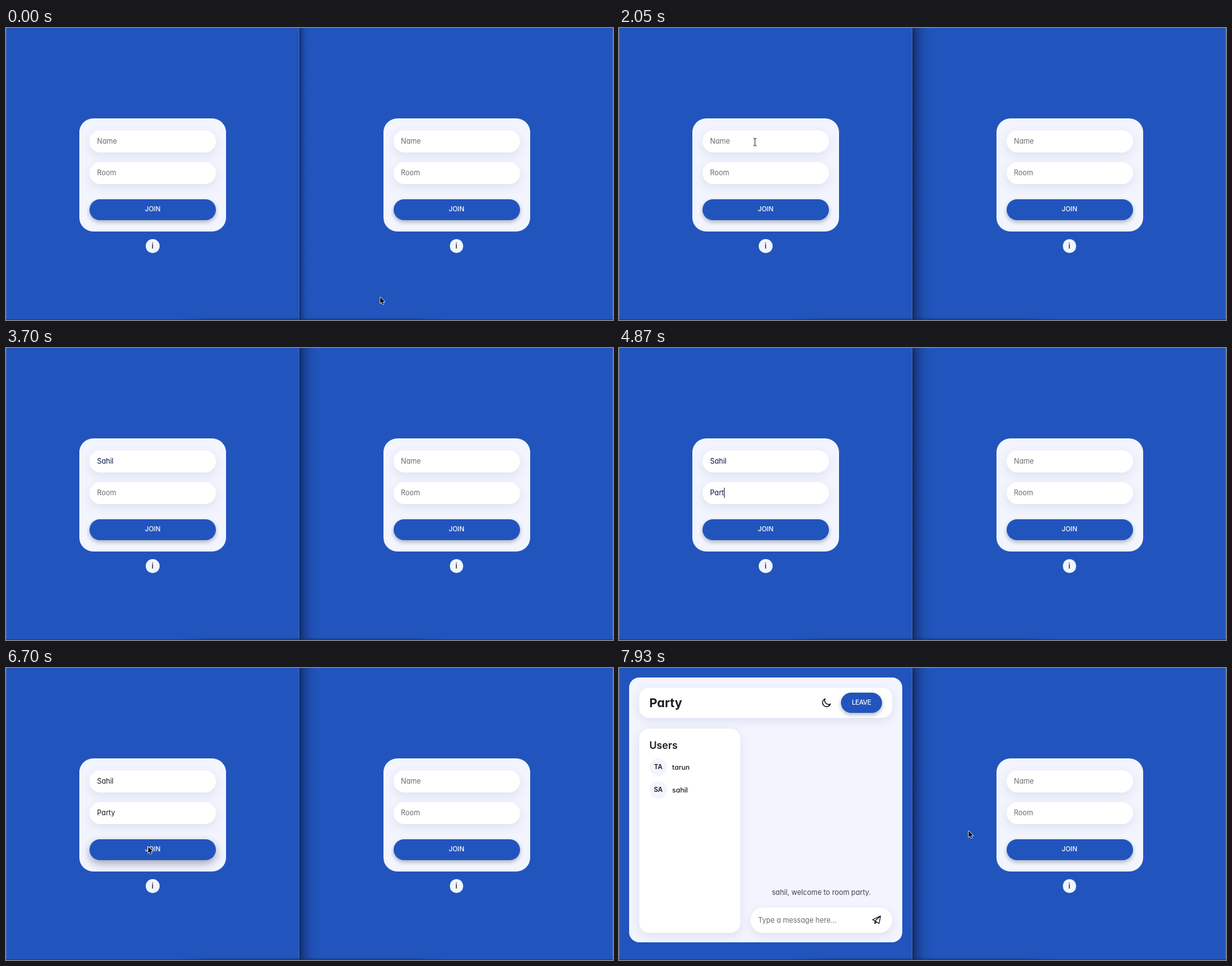
Write an HTML page that moves like this. It is 960 px wide and 462 px high and loops after 8000 ms.

```html
<!DOCTYPE html>
<html lang="en">
<head>
<meta charset="utf-8">
<title>Chat room sign-in</title>
<style>
  html, body { margin: 0; width: 100%; height: 100%; overflow: hidden; background: #2155bd; }
  #stage {
    position: relative; width: 960px; height: 462px; overflow: hidden; background: #2155bd;
    font: 400 11.2px/20px Inter, "Open Sans", sans-serif;
    font-feature-settings: "cv11"; color: #1c1c20;
  }
  #stage div, #stage svg { position: absolute; box-sizing: border-box; }
  .t { height: 20px; margin-top: -10px; white-space: pre; }
  .card { background: #f2f5fe; border-radius: 22px; overflow: hidden; }
  .white { background: #fff; box-shadow: 0 5px 15px rgba(70, 70, 120, .11); }
  .field { left: 16px; width: 200px; height: 34.5px; border-radius: 17.5px; }
  .field .t { left: 12px; top: 17px; }
  .hint { color: #6c6c70; }
  .btn {
    background: #2155bd; color: #fff; border-radius: 17px; text-align: center;
    font-weight: 500; font-size: 10.4px; box-shadow: 0 3px 6px rgba(20, 25, 60, .32);
  }
  .btn.hover { box-shadow: 0 5px 13px rgba(20, 25, 60, .38); }
  .info {
    left: 221px; top: 334px; width: 21.5px; height: 21.5px; border-radius: 50%;
    background: #f2f5fe; text-align: center; font-weight: 500; font-size: 12px; line-height: 21.5px;
  }
  .caret { display: inline-block; width: 1px; height: 16px; margin-right: -1px; vertical-align: -4px; background: #20243c; }
  .avatar {
    left: 16px; width: 28px; height: 28px; border-radius: 50%; background: #f2f5fe;
    text-align: center; font-weight: 600; font-size: 10.4px; line-height: 28px;
  }
  .user { left: 52px; font-weight: 500; font-size: 11px; }
</style>
</head>
<body>
<div id="stage">
  <div id="edge" style="left:465px;top:0;width:40px;height:462px"></div>
  <div style="left:0;top:0;width:1px;height:462px;background:#4a74c9"></div>
  <div style="left:959px;top:0;width:1px;height:462px;background:#4a74c9"></div>
  <div style="left:463px;top:0;width:1px;height:462px;background:#4269b5"></div>
  <div style="left:464px;top:0;width:1px;height:462px;background:#122a60"></div>
  <div style="left:275px;top:457px;width:415px;height:5px;background:linear-gradient(90deg,transparent,rgba(8,22,60,.3) 12%,rgba(8,22,60,.3) 88%,transparent);-webkit-mask-image:linear-gradient(transparent,#000)"></div>
  <div style="left:0;top:461px;width:960px;height:1px;background:#173a80"></div>

  <div id="left" style="left:0;top:0"></div>
  <div id="right" style="left:480.5px;top:0"></div>

  <div id="chat" class="card" style="left:16px;top:14.5px;width:432px;height:419.5px;border-radius:16px">
    <div class="white" style="left:16px;top:16px;width:400px;height:48.5px;border-radius:16px">
      <div class="t" style="left:16px;top:24.5px;font-weight:700;font-size:19.3px">Party</div>
      <svg class="icon" style="left:288px;top:16.5px" width="16" height="16" viewBox="0 0 16 16" fill="none" stroke="#111" stroke-width="1.4" stroke-linejoin="round">
        <path d="M6 1.8A6.4 6.4 0 1 0 14.3 10A6.2 6.2 0 0 1 6 1.8Z"/>
      </svg>
      <div class="btn" style="left:319px;top:8.5px;width:65px;height:32px;line-height:32px;letter-spacing:-.4px">LEAVE</div>
    </div>
    <div class="white" style="left:16px;top:81px;width:160px;height:323px;border-radius:16px">
      <div class="t" style="left:16px;top:27.5px;font-weight:600;font-size:15.8px">Users</div>
      <div class="avatar" style="top:47px">TA</div>
      <div class="t user" style="top:61px">tarun</div>
      <div class="avatar" style="top:83px">SA</div>
      <div class="t user" style="top:97px">sahil</div>
    </div>
    <div class="t" style="left:192px;top:340px;width:224px;text-align:center;color:#424248">sahil, welcome to room party.</div>
    <div class="white" style="left:192px;top:364.5px;width:224px;height:39.5px;border-radius:20px">
      <div class="t hint" style="left:12px;top:20px">Type a message here...</div>
      <svg class="icon" style="left:192px;top:12px" width="15" height="15" viewBox="0 0 15 15" fill="none" stroke="#111" stroke-width="1.25" stroke-linejoin="round">
        <path d="M13.6 1.3L1 7.2L4.7 9.2L11.4 13.2ZM13.6 1.3L4.7 9.2V13.4L7.2 10.8"/>
      </svg>
    </div>
  </div>

  <svg id="arrow" width="12" height="16" viewBox="-2 -2 12 16">
    <path d="M0 0V9.6L2.2 7.6L3.7 11.1L5.4 10.4L3.9 7H7Z" fill="#000" stroke="#fff" stroke-width="1.3" stroke-linejoin="round" paint-order="stroke"/>
  </svg>
  <svg id="beam" width="6" height="13" viewBox="0 0 6 13" fill="none" stroke="#222" stroke-width="1">
    <path d="M.5.5Q3 .5 3 2V11Q3 12.5 .5 12.5M5.5.5Q3 .5 3 2M3 11Q3 12.5 5.5 12.5"/>
  </svg>
</div>
<script>
  const LOOP = 8000;
  const $ = id => document.getElementById(id);

  const form = `
    <div class="card" style="left:116px;top:143px;width:232px;height:179px">
      <div class="white field" style="top:19px"><div class="t name hint">Name</div></div>
      <div class="white field" style="top:69px"><div class="t room hint">Room</div></div>
      <div class="btn" style="left:16px;top:128px;width:200px;height:32.5px;line-height:32.5px">JOIN</div>
    </div>
    <div class="info">i</div>`;
  $('left').innerHTML = $('right').innerHTML = form;
  const nameBox = $('left').querySelector('.name');
  const roomBox = $('left').querySelector('.room');
  const join = $('left').querySelector('.btn');
  const icons = document.querySelectorAll('.icon');

  // [time, shape, x, y]
  const pointer = [
    [0, 'arrow', 592, 426], [50, 'arrow', 575, 397],
    [520, 'arrow', 505, 350], [580, 'arrow', 400, 282], [640, 'arrow', 310, 226], [700, 'arrow', 261, 195],
    [930, 'arrow', 250, 188], [990, 'arrow', 242, 182], [1050, 'arrow', 238, 180],
    [1230, 'beam', 224, 174], [1930, 'beam', 218, 174], [2050, 'beam', 212, 174], [2520, 'none', 0, 0]
  ];
  // Sweep from the first field down to the button
  for (let i = 0; i < 13; i++) {
    const p = i / 12, e = p * p * (3 - 2 * p);
    const x = 213 + 12 * e + 36 * Math.sin(Math.PI * e), y = 177 + 106 * e;
    pointer.push([5870 + i * 63, y < 236 ? 'beam' : 'arrow', x, y]);
  }
  pointer.push([6700, 'arrow', 225, 283],
    [7750, 'arrow', 290, 280], [7810, 'arrow', 420, 270], [7870, 'arrow', 515, 262], [7930, 'arrow', 553, 258]);

  // [time, text, caret]
  const nameSteps = [[0, '', 0], [1870, '', 1], [2050, '', 0], [2520, 'S', 1], [2700, 'Sa', 1],
    [3050, 'Sah', 1], [3120, 'Sahi', 1], [3280, 'Sahil', 1], [3520, 'Sahil', 0]];
  const roomSteps = [[0, '', 0], [3520, '', 1], [3700, '', 0], [4280, 'P', 1], [4350, 'Pa', 1],
    [4520, 'Par', 1], [4870, 'Part', 1], [5050, 'Party', 1], [5280, 'Party', 0]];

  const at = (steps, t) => steps.reduce((now, s) => s[0] <= t ? s : now);

  function showField(box, hint, steps, t) {
    const [, text, caret] = at(steps, t);
    const mark = '<span class="caret"></span>';
    const html = text ? text + (caret ? mark : '') : (caret ? mark : '') + hint;
    if (box.shown !== html) box.innerHTML = box.shown = html;
    box.classList.toggle('hint', !text);
    box.style.color = text ? (t < 5870 ? '#0a1642' : '#1c1c20') : '';
  }

  function draw(t) {
    showField(nameBox, 'Name', nameSteps, t);
    showField(roomBox, 'Room', roomSteps, t);
    join.classList.toggle('hover', t >= 6700);

    const inChat = t >= 6930;
    $('left').style.display = inChat ? 'none' : '';
    $('chat').style.display = inChat ? '' : 'none';
    icons.forEach(i => i.style.display = t >= 7000 ? '' : 'none');

    $('edge').style.background = t < 990
      ? 'linear-gradient(90deg,rgba(8,22,60,.5),rgba(8,22,60,.2) 5px,rgba(8,22,60,.05) 11px,transparent 18px)'
      : 'linear-gradient(90deg,rgba(8,22,60,.62),rgba(8,22,60,.36) 6px,rgba(8,22,60,.14) 15px,rgba(8,22,60,.04) 24px,transparent 34px)';

    const [, shape, x, y] = at(pointer, t);
    for (const id of ['arrow', 'beam']) {
      const pad = id === 'arrow' ? 2 : 0, s = $(id).style;
      s.display = id === shape ? '' : 'none';
      s.left = x - pad + 'px';
      s.top = y - pad + 'px';
    }
  }

  const start = performance.now();
  function tick() {
    draw((performance.now() - start) % LOOP);
    requestAnimationFrame(tick);
  }
  tick();
</script>
</body>
</html>
```
